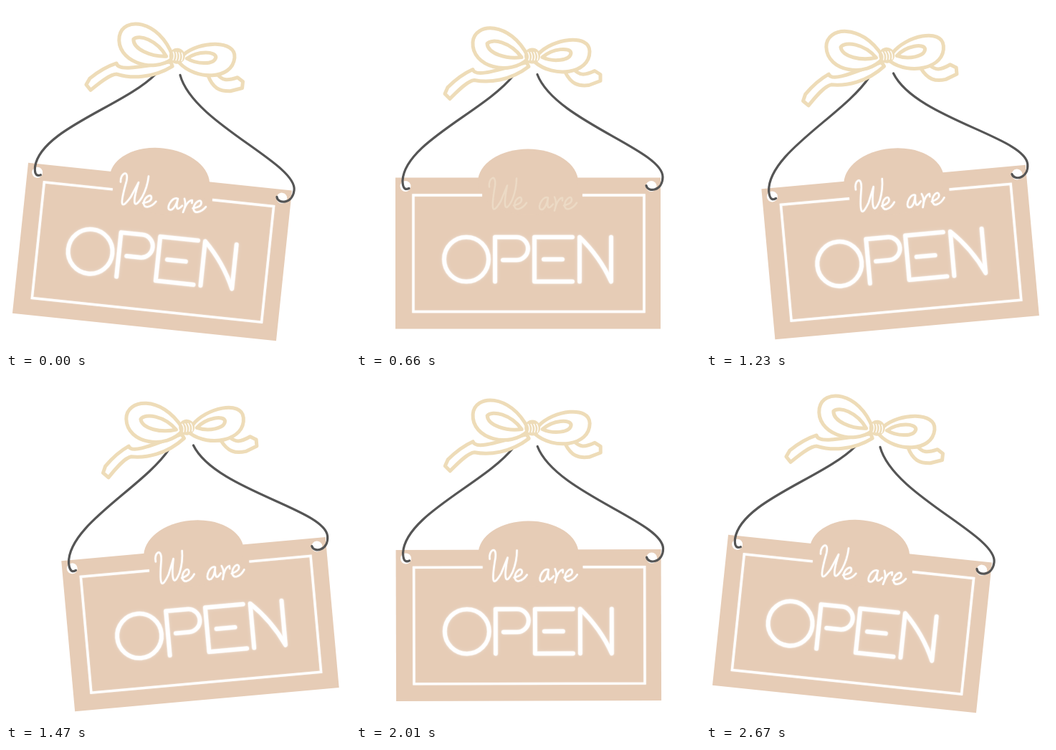
An HTML page with a canvas for the animation above (2740 ms loop, 480 by 480 pixels).

```html
<!DOCTYPE html>
<html lang="en">
<head>
<meta charset="utf-8">
<title>Swinging open sign</title>
<style>
  html, body { margin: 0; width: 100%; height: 100%; overflow: hidden; background: #fff; }
  canvas { display: block; width: 480px; height: 480px; }
</style>
</head>
<body>
<canvas id="stage" width="480" height="480"></canvas>
<script>
const ctx = document.getElementById('stage').getContext('2d');
const LOOP = 2740, STEP = 30, TURN = 1350, END = 2670;
const START_ANGLE = 6, SPEED = START_ANGLE / 660;
const TAN = '#e6ccb6', CREAM = '#eedcb8', CORD = '#555', DIM = '#ecdac5', WHITE = '#fff';

const cords = [
  new Path2D('M219 97 C180 146 68 190 65 243 C65 256 70 256 74 254'),
  new Path2D('M253 95 C278 160 428 200 428 238 C428 258 407 260 405 250')
];

const bow = {
  leftTail: 'M163 88 C166 100 200 88 238 78 L241 84 C215 104 185 107 165 103 C155 104 140 120 131 129 L124 122 L128 113 Q145 96 163 88Z',
  rightTail: 'M292 92 C300 108 310 112 325 110 L341 104 L341 95 L333 90 C318 97 312 96 304 88Z',
  leftLoop: 'M240 70 C215 20 165 22 163 50 C161 85 215 98 240 73Z',
  leftHole: 'M231 71 C216 50 190 44 183 52 C184 66 210 74 231 71Z',
  rightLoop: 'M254 67 C275 44 326 38 326 63 C326 95 275 100 250 78Z',
  rightHole: 'M260 71 C275 58 299 57 300 65 C299 76 275 78 260 71Z'
};
const bowParts = Object.values(bow).map(d => new Path2D(d));

// Handwritten letters, lower case ones relative to their own left top
const glyphs = {
  W: 'M0 13 C-2 1 10 -7 8 11 C2 46 4 53 16 33 L25 11 C19 41 22 51 32 31 Q38 16 38 1',
  e: 'M0 13 Q12 10 11 4 C10 -2 2 4 1 12 C1 22 12 18 18 9',
  a: 'M13 2 C4 -2 -5 22 6 18 Q11 14 13 2 Q10 24 20 11',
  r: 'M0 0 Q4 8 0 19 Q4 2 11 1 L11 5'
};

function makePath(build) {
  const path = new Path2D();
  build(path);
  return path;
}

function line(path, x, y, ...rest) {
  path.moveTo(x, y);
  for (let i = 0; i < rest.length; i += 2) path.lineTo(rest[i], rest[i + 1]);
}

const weAre = makePath(p => {
  const put = (letter, x, y) => p.addPath(new Path2D(glyphs[letter]), new DOMMatrix([1, 0, 0, 1, x, y]));
  put('W', 186, 239);
  put('e', 220, 265);
  put('a', 255, 265);
  put('r', 277, 266);
  put('e', 290, 265);
});

const open = makePath(p => {
  const top = 322, bottom = 384, middle = 353;
  p.arc(154, middle, 31, 0, 2 * Math.PI);
  line(p, 194, bottom, 194, top, 224, top);
  p.arc(224, top + 16, 16, -Math.PI / 2, Math.PI / 2);
  p.lineTo(205, top + 32);
  line(p, 302, top, 249, top, 249, bottom, 302, bottom);
  line(p, 262, middle, 288, middle);
  line(p, 312, bottom, 312, top);
  p.quadraticCurveTo(340, 349, 356, bottom);
  p.lineTo(356, top);
});

const border = makePath(p => line(p, 176, 263.5, 80, 263.5, 80, 426, 402, 426, 402, 263.5, 316, 263.5));

function stroke(path, color, width, blur = 0) {
  ctx.save();
  ctx.strokeStyle = color;
  ctx.lineWidth = width;
  ctx.shadowColor = 'rgba(255,255,255,.5)';
  ctx.shadowBlur = blur;
  ctx.stroke(path);
  ctx.restore();
}

function disc(x, y, rx, ry, color) {
  ctx.fillStyle = color;
  ctx.beginPath();
  ctx.ellipse(x, y, rx, ry, 0, 0, 2 * Math.PI);
  ctx.fill();
}

function drawBoard() {
  ctx.fillStyle = TAN;
  ctx.fillRect(55, 239, 370, 211);
  disc(240, 245, 70, 46, TAN);
  for (const x of [69, 412]) disc(x, 251, 7.5, 7.5, WHITE);
  ctx.lineCap = 'butt';
  ctx.lineJoin = 'miter';
  stroke(border, WHITE, 3.4, 2);
  ctx.lineCap = ctx.lineJoin = 'round';
}

function drawBow() {
  for (const part of bowParts) {
    ctx.fillStyle = WHITE;
    ctx.fill(part);
    stroke(part, CREAM, 5);
  }
  disc(246, 69, 11, 11, CREAM);
  for (let x = 240; x < 255; x += 4) {
    stroke(makePath(p => {
      p.moveTo(x, 64);
      p.quadraticCurveTo(x + 3, 69, x + 1, 75);
    }), WHITE, 1.4);
  }
}

// The neon words flicker: each dims once, then both go dark
function drawText(t) {
  const within = (from, to) => t >= from && t < to;
  if (within(2160, 2400)) return;
  if (within(570, 750)) stroke(weAre, DIM, 2.5);
  else stroke(weAre, WHITE, 2.5, 2);
  if (within(930, 1110)) stroke(open, DIM, 7);
  else {
    stroke(open, 'rgba(255,255,255,.3)', 7, 7);
    stroke(open, WHITE, 5.6, 3);
  }
}

function swing(t) {
  const low = START_ANGLE - SPEED * TURN;
  return t < TURN
    ? START_ANGLE - SPEED * t
    : low + (START_ANGLE - low) * (t - TURN) / (END - TURN);
}

function draw(now) {
  const t = Math.min(END, Math.floor((now % LOOP) / STEP) * STEP);
  ctx.setTransform(1, 0, 0, 1, 0, 0);
  ctx.fillStyle = WHITE;
  ctx.fillRect(0, 0, 480, 480);
  ctx.translate(240, 0.5);
  ctx.rotate(swing(t) * Math.PI / 180);
  ctx.translate(-240, 0);
  drawBoard();
  drawText(t);
  for (const cord of cords) stroke(cord, CORD, 3.2);
  drawBow();
}

let start;
function tick(now) {
  start ??= now;
  draw(Math.max(0, now - start));
  requestAnimationFrame(tick);
}
draw(0);
requestAnimationFrame(tick);
</script>
</body>
</html>
```
